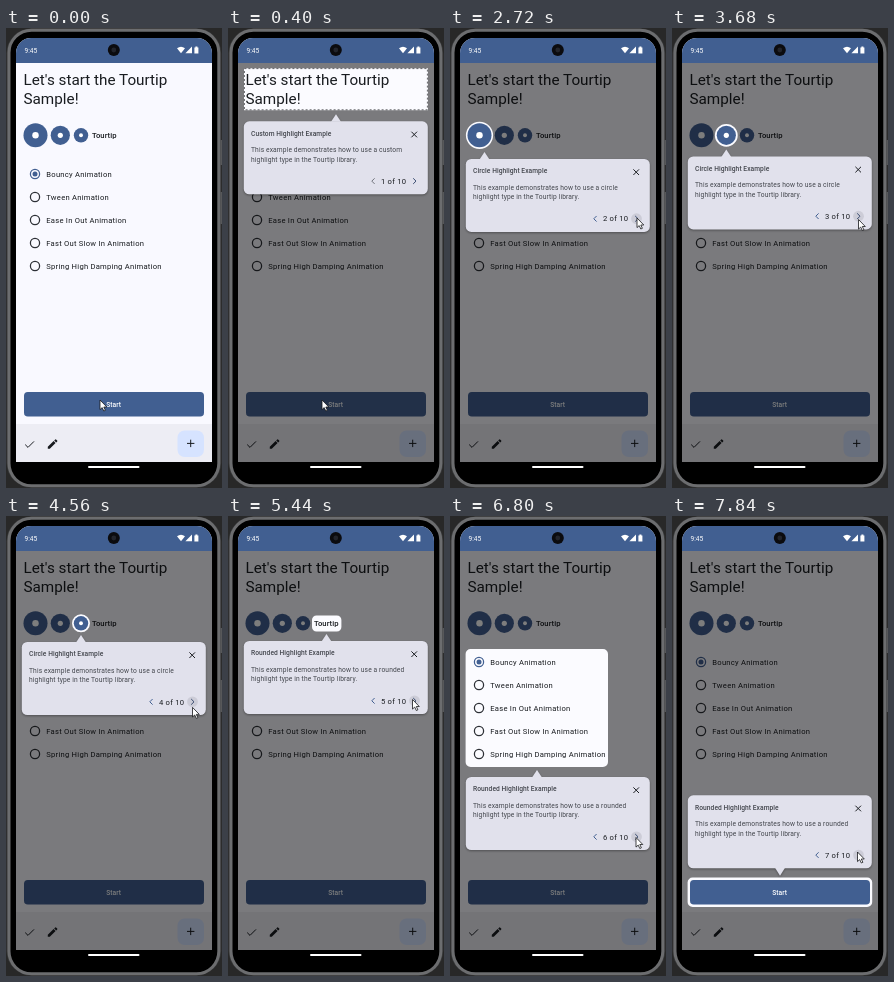
Animation of 216 by 460 pixels, one loop 8 s. Source, as an HTML page:

```html
<!DOCTYPE html>
<html lang="en">
<head>
<meta charset="utf-8">
<title>Tourtip sample</title>
<style>
  html, body { margin: 0; width: 100%; height: 100%; overflow: hidden; background: #282828; }
  svg { display: block; width: 100%; height: 100%; font-family: Roboto, sans-serif; }
  text { fill: #191c20; white-space: pre; }
  .head { font-size: 15.27px; }
  .item { font-size: 7.63px; letter-spacing: .24px; }
  .label { font-size: 7.63px; font-weight: 500; letter-spacing: .07px; }
  .title { font-size: 6.68px; font-weight: 500; letter-spacing: .05px; fill: #44474e; }
  .body { font-size: 6.68px; letter-spacing: .12px; fill: #44474e; }
  .line { fill: none; stroke: #191c20; stroke-width: 1; }
  .ring { fill: none; stroke: #2c2f35; stroke-width: 1.25; }
  .blue { fill: #415f91; }
  .white { fill: #fff; }
  #tip { filter: drop-shadow(0 1px 1.2px rgba(0, 0, 0, .35)); }
</style>
</head>
<body>
<svg viewBox="0 0 216 460">
  <!-- phone body -->
  <rect x=".6" y=".4" width="214.6" height="459.2" rx="25" fill="#3c3d3e"/>
  <rect x="3" y="2.2" width="209.8" height="455.6" rx="22.5" fill="#000" stroke="#6c6d6f" stroke-width="3"/>
  <rect x="214.4" y="112" width="1.6" height="25" fill="#57585a"/>
  <rect x="214.4" y="164" width="1.6" height="32" fill="#57585a"/>

  <!-- screen -->
  <path d="M10 434V25A15 15 0 0 1 25 10H191A15 15 0 0 1 206 25V434Z" fill="#f9f9ff"/>
  <path d="M10 35V25A15 15 0 0 1 25 10H191A15 15 0 0 1 206 25V35Z" class="blue"/>
  <circle cx="107.8" cy="22" r="6" fill="#0b0b0e"/>
  <circle cx="107.8" cy="22" r="2.4" fill="#22242b"/>
  <text x="18.5" y="24.7" font-size="6.6" class="white">9:45</text>
  <g class="white">
    <path d="M171 20.3Q175 17.3 179 20.3L175 25.3Z"/>
    <path d="M186 18.5V25.3H179.4Z"/>
    <path d="M188.4 19.4H189.4V18.6H191.4V19.4H192.4V25.4H188.4Z"/>
  </g>
  <rect x="82" y="438.1" width="51.5" height="2" rx="1" class="white"/>

  <path id="glow" fill="#fbfbff"/>

  <text class="head" x="17.5" y="57">Let's start the Tourtip</text>
  <text class="head" x="17.5" y="76">Sample!</text>
  <g id="dots"></g>
  <text class="label" x="86" y="110.2">Tourtip</text>
  <g id="radios"></g>
  <rect x="18" y="364" width="180" height="24.5" rx="3.8" class="blue"/>
  <rect id="press" x="18" y="364" width="180" height="24.5" rx="3.8" class="white" opacity="0"/>
  <text x="107.7" y="378.6" text-anchor="middle" class="title" style="fill:#fff">Start</text>

  <!-- bottom bar -->
  <rect x="10" y="396" width="196" height="38" fill="#ededf4"/>
  <path d="M19.2 416.6L22 419.4L28 413.4" class="line"/>
  <path d="M41.8 420.8V418.8L47.6 413L49.6 415L43.8 420.8ZM48.2 412.4L49.2 411.4Q49.6 411 50 411.4L51.2 412.6Q51.6 413 51.2 413.4L50.2 414.4Z" fill="#191c20"/>
  <rect x="171.5" y="402.5" width="26.5" height="26.5" rx="7.2" fill="#d6e3ff"/>
  <path d="M181 415.4H188.4M184.7 411.7V419.1" class="line"/>

  <path id="scrim" fill="#000" fill-opacity=".51" fill-rule="evenodd"/>
  <rect id="dash" x="16.4" y="40.6" width="183" height="41.2" fill="none" stroke="#55565a" stroke-width=".9" stroke-dasharray="2 2"/>

  <!-- tooltip, laid out from its own top edge -->
  <g id="tip">
    <path id="arrow" fill="#e1e1ec"/>
    <rect x="15.8" width="184" height="73" rx="5.5" fill="#e1e1ec"/>
    <text id="name" class="title" x="23" y="14.4"></text>
    <text id="row1" class="body" x="23" y="30.8"></text>
    <text id="row2" class="body" x="23" y="40.3">highlight type in the Tourtip library.</text>
    <path d="M183.4 10.4L189 16M189 10.4L183.4 16" class="line"/>
    <circle id="hover" cx="186.5" cy="59.8" r="5.4" fill="#44474e" opacity=".13"/>
    <path id="prev" d="M146.6 57L143.8 59.8L146.6 62.6" class="line"/>
    <path d="M185.2 57L188 59.8L185.2 62.6" class="line" style="stroke:#36496e"/>
    <text id="count" class="item" x="165.6" y="62.5" text-anchor="middle"></text>
  </g>

  <path id="cursor" d="M0 0V9.6L2.2 7.6L3.8 11L5.4 10.3L3.8 7H6.8Z" fill="#fff" stroke="#17181b" stroke-width=".8"/>
</svg>
<script>
const LOOP = 8000;
const $ = id => document.getElementById(id);

const box = (x, y, w, h, r) =>
  `M${x + r} ${y}h${w - 2 * r}a${r} ${r} 0 0 1 ${r} ${r}v${h - 2 * r}a${r} ${r} 0 0 1 ${-r} ${r}` +
  `h${2 * r - w}a${r} ${r} 0 0 1 ${-r} ${-r}v${2 * r - h}a${r} ${r} 0 0 1 ${r} ${-r}Z`;
const disc = (x, y, r) => box(x - r, y - r, 2 * r, 2 * r, r);

$('dots').innerHTML = [[29.5, 12], [54.3, 9.6], [75, 7.2]].map(([x, r]) =>
  `<circle cx="${x}" cy="107.3" r="${r}" class="blue"/><circle cx="${x}" cy="107.3" r="${r * .27}" class="white"/>`).join('');

$('radios').innerHTML = ['Bouncy', 'Tween', 'Ease In Out', 'Fast Out Slow In', 'Spring High Damping'].map((name, i) => {
  const y = 146 + 23 * i;
  const ring = `<circle cx="29" cy="${y}" r="4.6" class="ring"${i ? '' : ' style="stroke:#415f91"'}/>`;
  const dot = i ? '' : `<circle cx="29" cy="${y}" r="2.5" class="blue"/>`;
  return `${ring}${dot}<text class="item" x="40.3" y="${y + 2.7}">${name} Animation</text>`;
}).join('');

// each stop of the tour: start time, kind, highlight, tooltip top, arrow x
const steps = [
  { at: 110, kind: 'Custom', hole: box(16, 40.2, 184, 42, 0), y: 92.3, x: 108 },
  { at: 2015, kind: 'Circle', hole: disc(29.5, 107.3, 13.6), y: 131, x: 34.5 },
  { at: 3040, kind: 'Circle', hole: disc(54.3, 107.3, 11.4), y: 128.4, x: 54.3 },
  { at: 3840, kind: 'Circle', hole: disc(75, 107.3, 9), y: 126, x: 75 },
  { at: 4720, kind: 'Rounded', hole: box(84, 99.5, 29.4, 16, 4.5), y: 125, x: 98.5 },
  { at: 5520, kind: 'Rounded', hole: box(15.6, 133, 142.4, 118, 5), y: 261, x: 87 },
  { at: 6960, kind: 'Rounded', hole: box(15.6, 361.6, 184.6, 29.4, 5), y: 279.3, x: 108, below: true }
];

// pointer stops: time, x, y
const path = [
  [0, 94, 372], [900, 94, 372], [1600, 187, 152], [1900, 186.5, 151.5], [2160, 186.5, 151.5],
  [2720, 187, 190], [2880, 187, 192], [3480, 187, 192], [3680, 186.5, 191.5], [5200, 186.5, 191.3],
  [5440, 184.5, 183.5], [5700, 184.5, 183.5], [6640, 187.5, 319], [6800, 186, 321.5],
  [7040, 186, 321.5], [7680, 186.5, 334], [7840, 185.5, 336], [8000, 185.5, 336]
];

function cursorAt(t) {
  const i = path.findIndex(k => k[0] > t);
  const [t0, x0, y0] = path[i - 1], [t1, x1, y1] = path[i];
  const u = (t - t0) / (t1 - t0), e = u * u * (3 - 2 * u);
  return [x0 + (x1 - x0) * e, y0 + (y1 - y0) * e];
}

function spring(ms) {
  const w = 14 * ms / 1000, z = .75, d = Math.sqrt(1 - z * z);
  return 1 - Math.exp(-z * w) * (Math.cos(d * w) + z / d * Math.sin(d * w));
}

let shown = null;
function showStep(n) {
  if (n === shown) return;
  shown = n;
  const s = steps[n];
  for (const id of ['glow', 'scrim', 'dash', 'tip'])
    $(id).style.display = s && (id !== 'dash' || n === 0) ? '' : 'none';
  if (!s) return;
  $('glow').setAttribute('d', s.hole);
  $('scrim').setAttribute('d', 'M10 35H206V434H10Z' + s.hole);
  $('arrow').setAttribute('d', s.below
    ? `M${s.x - 5} 72.5h10l-5 8Z` : `M${s.x - 5} .5h10l-5 -7.5Z`);
  $('name').textContent = s.kind + ' Highlight Example';
  $('row1').textContent = 'This example demonstrates how to use a ' + s.kind.toLowerCase();
  $('count').textContent = `${n + 1} of 10`;
  $('prev').style.stroke = n ? '#415f91' : '#6f727a';
}

function draw(t) {
  const n = steps.filter(s => s.at <= t).length - 1;
  const [cx, cy] = cursorAt(t);
  showStep(n);
  $('cursor').setAttribute('transform', `translate(${cx} ${cy})`);
  $('press').setAttribute('opacity', t >= 80 && t < 480 ? .12 * (1 - (t - 80) / 400) : 0);
  if (n < 0) return;
  const s = steps[n], from = n ? steps[n - 1].y : 40;
  const y = from + (s.y - from) * spring(t - s.at);
  $('tip').setAttribute('transform', `translate(0 ${y})`);
  $('hover').style.display = Math.hypot(cx - 186.5, cy - y - 59.8) < 12 ? '' : 'none';
}

const begin = performance.now();
function tick() {
  draw((performance.now() - begin) % LOOP);
  requestAnimationFrame(tick);
}
tick();
</script>
</body>
</html>
```
